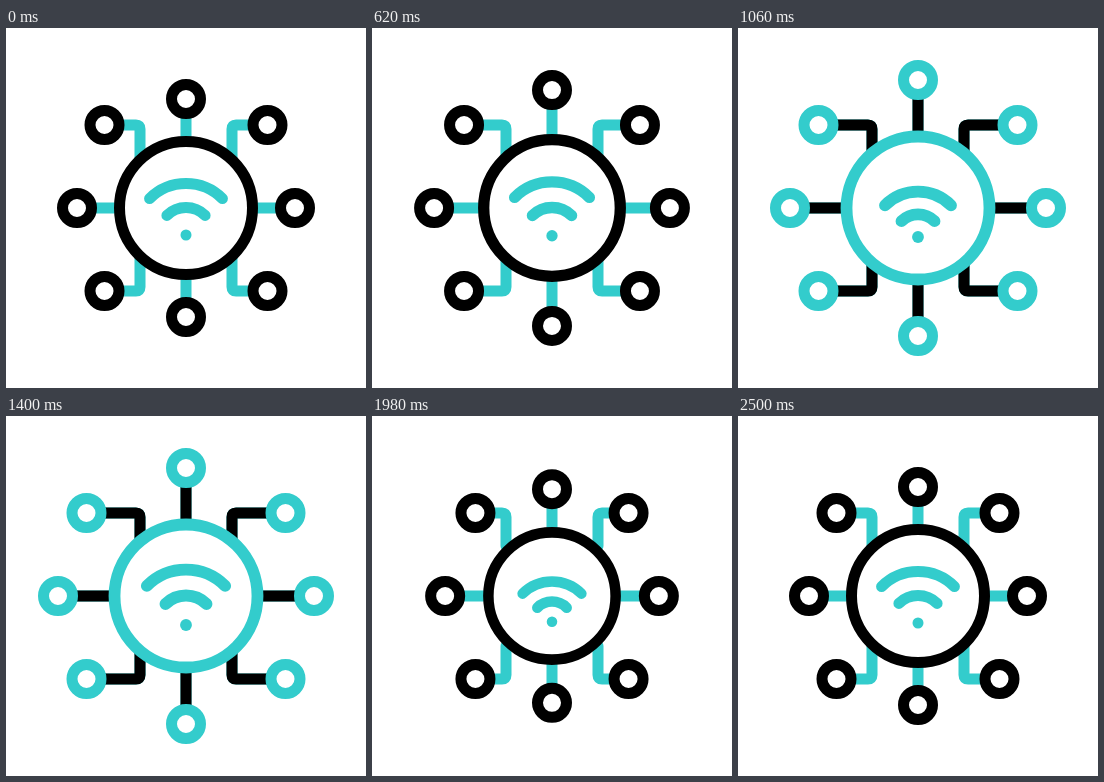
An HTML page with a canvas that plays this animation: 360 px wide and 360 px high, repeating every 2.92 s.

```html
<!DOCTYPE html>
<html lang="en">
<head>
<meta charset="utf-8">
<title>Wireless network</title>
<style>
html, body { margin: 0; height: 100%; overflow: hidden; background: #fff; }
canvas { display: block; width: 100vmin; height: 100vmin; }
</style>
</head>
<body>
<canvas id="stage" width="360" height="360"></canvas>
<script>
const ctx = document.getElementById('stage').getContext('2d');
const LOOP = 2920, TEAL = '#33cccc', BLACK = '#000';
const RING = 66.5, NODE = 14.5, WEIGHT = 11, CORNER_Y = 83;

// Smooth step from 0 to 1 between two times.
function ease(t, start, end) {
  const u = Math.min(1, Math.max(0, (t - start) / (end - start)));
  return u * u * (3 - 2 * u);
}

// Smooth hill of height 1 around a time.
function bump(t, center, half) {
  const u = (t - center) / half;
  return Math.abs(u) < 1 ? Math.cos(u * Math.PI / 2) ** 2 : 0;
}

const open = t => ease(t, 350, 1020) - ease(t, 1680, 1940);
const recoil = t => .5 * bump(t, 1700, 150) + bump(t, 2210, 190)
  - bump(t, 350, 150) - bump(t, 1950, 150);
const spread = (t, rest, gain, kick) => rest + gain * open(t) + kick * recoil(t);
const tint = t => ease(t, 650, 950) - ease(t, 1600, 1830);
const bareWire = t => 90 * (1 - ease(t, 520, 780) + ease(t, 1620, 1880));

// The signal pulses twice: it swells, then squashes.
const pulse = (t, half) => bump(t, 800, half) + bump(t, 1680, half);
const swell = t => pulse(t, 260);
const squash = t => pulse(t - 280, 220);

function stroke(path, color, width = WEIGHT) {
  ctx.strokeStyle = color;
  ctx.lineWidth = width;
  ctx.stroke(path);
}

function circle(x, y, r, color, width = WEIGHT) {
  const path = new Path2D();
  path.arc(x, y, r, 0, 2 * Math.PI);
  ctx.fillStyle = '#fff';
  ctx.fill(path);
  stroke(path, color, width);
}

// A teal wire whose outer part is covered by a black one.
function wire(d, covered) {
  const path = new Path2D(d);
  stroke(path, TEAL);
  if (covered <= 0) return;
  ctx.setLineDash([covered, 500]);
  stroke(path, BLACK);
  ctx.setLineDash([]);
}

// An arc of a quarter turn whose top lies at the given height.
function signal(radius, top) {
  const path = new Path2D();
  path.arc(0, radius - top, radius, -.75 * Math.PI, -.25 * Math.PI);
  stroke(path, TEAL);
}

function draw(t) {
  const ring = spread(t, RING, 5, 3.2), scale = ring / RING;
  const corner = spread(t, 81.5, 18, 5.5);
  const side = spread(t + 50, 109, 19, 5);
  const mix = tint(t), bare = bareWire(t);
  const color = `rgb(${51 * mix}, ${204 * mix}, ${204 * mix})`;

  ctx.setTransform(1, 0, 0, 1, 0, 0);
  ctx.clearRect(0, 0, 360, 360);
  ctx.translate(180, 180);
  ctx.lineCap = 'round';

  for (let i = 0; i < 4; i++) {
    ctx.save();
    ctx.rotate(i * Math.PI / 2);
    wire(`M0 ${-side}V-66`, side - 66 - bare);
    circle(0, -side, NODE, color);
    ctx.restore();

    ctx.save();
    ctx.scale(i % 2 ? 1 : -1, i < 2 ? 1 : -1);
    wire(`M${corner} ${-CORNER_Y}H50q-4 0 -4 4V-50`, corner - 15 - bare);
    circle(corner, -CORNER_Y, NODE, color);
    ctx.restore();
  }

  circle(0, 0, ring, color, WEIGHT * scale);

  ctx.scale(scale, scale);
  ctx.translate(0, 27);
  const down = squash(t);
  signal(51.5 * (1 - .16 * down), 51.5 + 4 * swell(t) - 9.5 * down);
  signal(27 * (1 - .2 * down), 27.5 - 6.5 * down);
  ctx.fillStyle = TEAL;
  ctx.beginPath();
  ctx.arc(0, 0, 5.5, 0, 2 * Math.PI);
  ctx.fill();
}

function frame() {
  draw(performance.now() % LOOP);
  requestAnimationFrame(frame);
}
frame();
</script>
</body>
</html>
```
